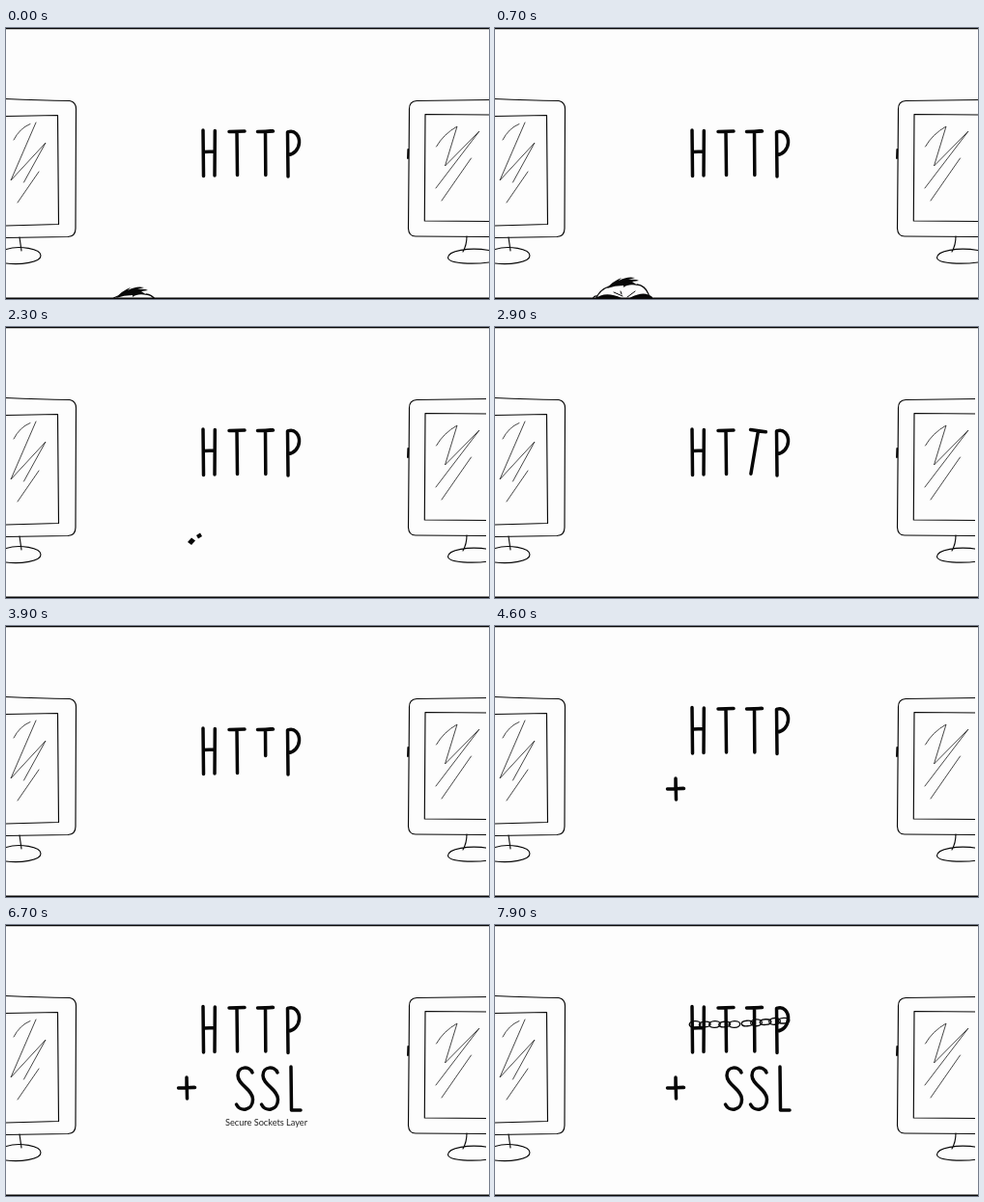
These frames come from a looping animation (500x281 px, 8 s). An HTML page:

```html
<!DOCTYPE html>
<html lang="en">
<head>
<meta charset="utf-8">
<title>HTTP + SSL</title>
<style>
  html, body { margin: 0; width: 100%; height: 100%; overflow: hidden; background: #fdfdfd; }
  svg { display: block; width: 100vw; height: 100vh; }
  path, ellipse { fill: none; stroke: #080808; stroke-linecap: round; stroke-linejoin: round; }
  .thin { stroke-width: 1.15; }
  .glint { stroke-width: .9; }
  .glint path { stroke: #333; }
  .pen { stroke-width: 3.5; }
  .ink { fill: #080808; stroke: none; }
  .eye { fill: #fdfdfd; stroke: none; }
  #caption { font: 9.2px Lato, sans-serif; fill: #222; }
</style>
</head>
<body>
<svg viewBox="0 0 500 281" role="img" aria-label="HTTP + SSL">
  <rect width="500" height="281" fill="#fdfdfd"/>

  <g class="thin">
    <path d="M0 73.500Q35 75 66 75.500Q73 77 72.500 85L72 208Q72 216 64 216.500L0 217.500"/>
    <path d="M0 91.500L53.500 90.500L54.500 203.500L0 205"/>
    <path d="M14 217L16 231M0 229.500C14 225 36 229 36 236C36 243 15 246 0 244"/>
    <path d="M500 74.500L425 75.500Q417 76 417.500 85L416.500 208Q417 216 424 216L500 216.500"/>
    <path d="M500 90L434 89.500L433.300 200L500 200.500"/>
    <path d="M477 216Q477 225 473 232M500 230.500C479 227 457.500 231 457.500 238C458 245 485 245 500 243"/>
  </g>
  <g class="glint">
    <path d="M8 116Q14 104 25 99.500M31 98L5 158L41 119L18.500 160M34 149L12 181"/>
    <path d="M445.500 123Q453 110 467 102L454.500 143L490 107L445 166M481.500 135L451 179"/>
  </g>
  <path d="M416.300 126L416 135" stroke-width="1.9"/>
  <rect id="margin" x="497" width="3" height="281" fill="#fdfdfd"/>

  <g id="head">
    <path d="M101 300C99 274 106 262 118 258M147 256C157 257 163 266 163 300" stroke-width="1.3"/>
    <path class="ink" d="M116 260Q121 253 131 249L128 252Q137 247 145 249L138 251Q146 250 149 252L142 253L148 257Q138 255 133 259L133 257Q124 257 116 260Z"/>
    <path class="ink" d="M103 271Q114 262 131 270Q136 273 141 269Q155 262 163 269V300H102Z"/>
    <path class="eye" d="M111 272Q120 270 130 276Q119 281 111 272ZM139 276Q148 270 159 272Q153 281 139 276Z"/>
    <path class="ink" d="M119 272h5v5h-5zM147 272h5v5h-5z"/>
    <path d="M123 264L132 268M137 269L145 263M130 263L131 266" stroke-width="1"/>
    <path d="M106 268Q100 267 101 277" stroke-width="1.2"/>
  </g>

  <g id="http" class="pen">
    <path d="M204 106L204.500 153.500M216.300 106.500L216 153M205 128.500L216 128"/>
    <path d="M231 107.500L247 107M239 108L239.500 152.500"/>
    <path id="tee" pathLength="1" d="M260.500 107.500L276.500 107L268.500 107.500L268.800 152.500"/>
    <path d="M291.500 108L292 154M291.500 108C299 105 304 112 303.500 119C303 126 298 131 292 131.500"/>
  </g>

  <g class="pen">
    <path id="plus" pathLength="1" d="M178.500 169L195.500 168.500L187 168.700L187 158L187.500 180"/>
    <path id="s1" pathLength="1" d="M255 153C252 146 240 146 240 156C240 166 255.500 170 255.500 181C255.500 193 242 194 238.500 186"/>
    <path id="s2" pathLength="1" d="M281 153C278 146 266 146 266 156C266 166 281.500 170 281.500 181C281.500 193 268 194 264.500 186"/>
    <path id="ell" pathLength="1" d="M295 147L295.500 192L305 192"/>
  </g>
  <text id="caption" x="227" y="207.500">Secure Sockets Layer</text>

  <g id="chain" stroke-width="1.4"></g>
  <g id="bits">
    <path class="ink" d="M-8 3L-4 -1.500L0 1.500L-4 6Z"/>
    <path class="ink" d="M1 -4L5 -6.500L7 -3L3 -.5Z"/>
  </g>
  <path class="ink" d="M0 0H500V1.300H0ZM0 279.500H500V281H0Z"/>
</svg>

<script>
const $ = id => document.getElementById(id);
const ramp = (t, a, b) => Math.max(0, Math.min(1, (t - a) / (b - a)));
const show = (el, on) => el.style.display = on ? '' : 'none';
const move = (el, x, y) => el.setAttribute('transform', `translate(${x} ${y})`);

// Reveal the first part p of a pen stroke; each is one unbroken line.
function pen(id, p) {
  show($(id), p > 0);
  $(id).setAttribute('stroke-dasharray', p < 1 ? `${p} 2` : 'none');
}

// Two rows of five links that meet in the middle.
const links = Array.from({ length: 10 }, (_, i) => {
  const link = document.createElementNS('http://www.w3.org/2000/svg', 'ellipse');
  const x = i < 5 ? 207 + 10.2 * i : 261 + 9.5 * (i - 5);
  const y = i < 5 ? 103 : 102 - 0.7 * (i - 5);
  const attrs = { cx: x, cy: y, rx: 5.8, ry: i % 2 ? 2.8 : 3.4, transform: `rotate(-4 ${x} ${y})` };
  for (const k in attrs) link.setAttribute(k, attrs[k]);
  return $('chain').appendChild(link);
});

function draw(t) {
  show($('margin'), t >= 1900);

  const peek = t < 1200 ? 20 - 15 * ramp(t, 100, 1000)
    : t < 1700 ? 0 : 5 + 32 * ramp(t, 1800, 2200);
  move($('head'), peek > 15 ? -2 : 0, peek);

  // The bits fly from the mask to the second T and knock it out.
  const flight = (Math.min(t, 2700) - 1900) / 400;
  const hit = ramp(t, 2700, 2900);
  show($('bits'), t >= 2000 && t < 2900);
  move($('bits'), 146 + 50 * flight + 24 * hit, 248 - 28 * flight - 44 * hit);
  pen('tee', t < 3100 ? 1 : ramp(t, 3530, 4030));
  $('tee').setAttribute('transform', `rotate(${t >= 2900 && t < 3100 ? 10 : 0} 268 130)`);

  move($('http'), 0, -21.5 * ramp(t, 4000, 4300));
  pen('plus', ramp(t, 4300, 4500));
  pen('s1', ramp(t, 4600, 4900));
  pen('s2', ramp(t, 4900, 5200));
  pen('ell', ramp(t, 5150, 5550));
  show($('caption'), t >= 5700 && t < 7700);

  // Both halves of the chain close towards the middle.
  const closed = 5 * ramp(t, 7600, 7900);
  links.forEach((link, i) => show(link, Math.min(i, 9 - i) < closed));
}

function frame(now) {
  draw(Math.floor(now % 8000 / 100) * 100);
  requestAnimationFrame(frame);
}
draw(0);
requestAnimationFrame(frame);
</script>
</body>
</html>
```
